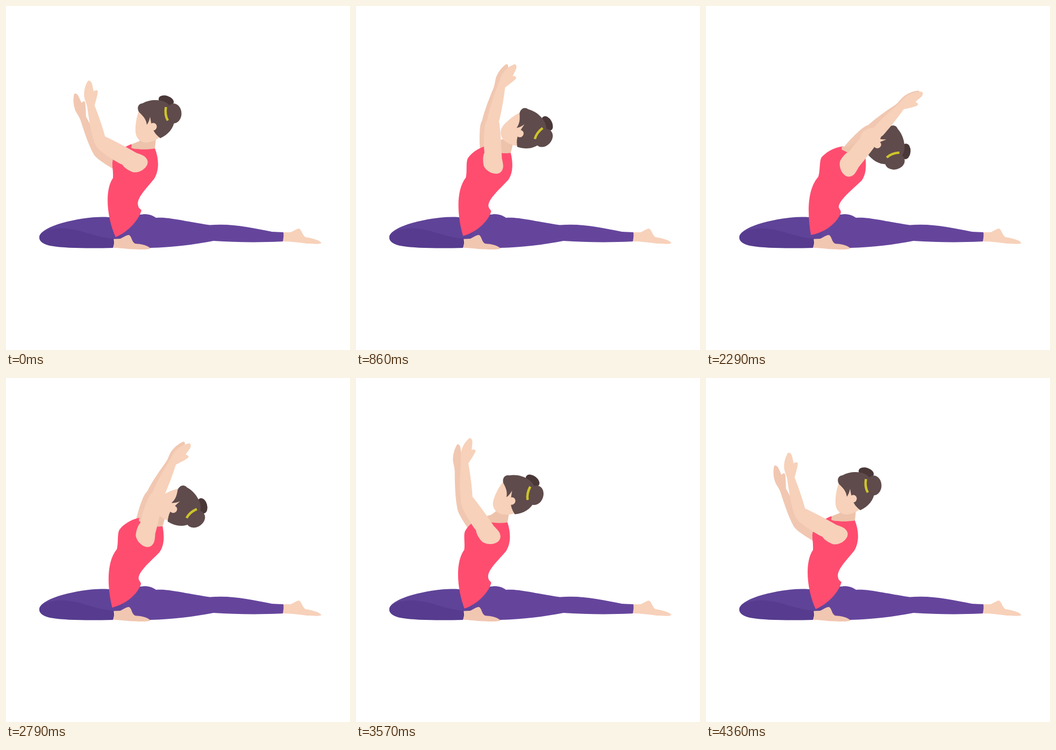
These frames come from a looping animation (640x640 px, 4.43 s). An HTML page:

```html
<!DOCTYPE html>
<html lang="en">
<head>
<meta charset="utf-8">
<title>Yoga stretch</title>
<style>
html, body { margin: 0; width: 100%; height: 100%; overflow: hidden; background: #fff; }
svg { display: block; width: 100vw; height: 100vh; }
.skin { fill: #f7d1ba; }
.shade { fill: #f1c7b1; }
.neck { fill: #edc3ab; }
.hair { fill: #5f4b4b; }
</style>
</head>
<body>
<svg viewBox="0 0 640 640">
  <defs>
    <path id="upper" d="M-17 6C-16 12 -12 16 -4 17C2 17 6 16 11 15C35 15 58 14 76 12.5C88 11 91 2 88 -5C86 -11 78 -14 68 -15.500C52 -18 32 -18 23 -17C18 -20 8 -21 -2 -19C-11 -15 -18 -4 -17 6Z"/>
    <path id="fore" d="M-6 -9C5 -12 32 -11 70 -6.500L70 6.500C45 10 25 11.500 5 12C-6 12 -10 0 -6 -9Z"/>
    <path id="hand" d="M-3 -6.500C8 -8 12 -11 20 -10.500C30 -10 40 -6 46 -1C47 2 44 5 40 6C34 7 30 7 25.500 8C28 11 28 15 25 15.500C20 15 12 12 -3 6.500Z"/>
  </defs>

  <g id="backArm" class="shade"></g>

  <path class="skin" d="M514 421L529 421C535 419 539 415 545 414C550 416 551 426 557 430C568 432 581 434 587 441C583 444 570 442 560 442C545 440 530 438 514 438Z"/>
  <path fill="#65459c" d="M200 392L250 388C262 386 272 389 279 394C300 392 325 399 379 407.500C420 404 455 412 495 420L516 421C517 427 516 433 515 438C480 440 430 440 386 437C350 444 310 449 268 450L235 452L200 433Z"/>
  <path fill="#5f4398" d="M62 430C62 420 82 410 105 403.500C135 395.500 165 391 192 393L225 400L213 433L200 434L100 440Z"/>
  <path fill="#563b8f" d="M62 430C63 420 80 414 105 413.500C140 415 163 430 200 433C202 439 201 445 199 450C160 451 110 451 85 446.500C70 444 61 438 62 430Z"/>
  <path class="shade" d="M201 433.500L212 433C218 431 223 426 229 426C234 429 234 439 240 442C250 443 262 444 269 451C265 454 245 453 235 452.500C225 452 212 450 199.500 450C201 445 202 439 201 433.500Z"/>

  <path id="torso" fill="#ff4d70"/>
  <path id="neck" class="neck"/>

  <g id="head">
    <ellipse cx="298" cy="176" rx="14.500" ry="9" transform="rotate(18 298 176)" fill="#4a3737"/>
    <path class="skin" d="M247 196C243 206 240 222 241 235C242 246 250 254 262 254C272 253 280 249 285 245L290 200L265 190Z"/>
    <path class="hair" d="M248 198C243 191 245 182 254 181C265 175 277 174 288 176C303 179 314 192 314 211C312 228 302 239 287 246C281 241 276 236 274 230L270 217L268 206C267 212 265 217 262 221C261 213 258 207 248 198Z"/>
    <ellipse cx="312" cy="200" rx="14.500" ry="18.500" class="hair"/>
    <ellipse cx="274" cy="224.500" rx="6.500" ry="7" class="skin"/>
    <path d="M297.500 188C296 197 297 206 301 213" fill="none" stroke="#cdc52a" stroke-width="4.500"/>
  </g>

  <g id="frontArm" class="skin"></g>
</svg>
<script>
const $ = id => document.getElementById(id);
const LOOP = 4430, FPS = 14, UPPER = 82, FORE = 68;

// Upright and leaning outlines of the trunk
const TORSO = [
  'M204 430C189 398 182 345 199 320C200 305 196 295 199 286C204 275 214 265 233 257C240 268 262 266 277 265C285 285 285 306 276 321C262 339 241 358 246 372C247 377 250 377 252 380C247 398 228 420 204 430Z',
  'M195 426C189 390 187 343 209 318C213 308 211 290 215 282C222 273 238 263 255 261C262 272 280 272 297 280C299 300 298 315 289 326C272 342 247 362 247 374C248 378 251 380 251 384C246 400 226 420 195 426Z'
];
const NECK = [
  'M234 257L247 252L255 245L279 246L277 265C262 268 240 267 233 264Z',
  'M253 262L268 261L285 250L305 258L297 280C280 283 262 272 253 267Z'
];

// Quadratic curves from upright to leaning.
// Head: x, y, turn. Arms: shoulder x, y, then upper arm, forearm and hand angles.
const HEAD = [[282, 194, 0], [341, 207, 39.5], [351, 262, 79]];
const FRONT = [[245, 292, 210, 256, 265], [256, 294, 266, 278, 304], [266, 299, 312, 315, 328]];
const BACK = [[241, 309, 209, 247, 251], [247, 298, 262, 282, 291], [252, 289, 315, 323, 325]];

const clamp = v => Math.min(1, Math.max(0, v));
const lerp = (a, b, k) => a + (b - a) * k;
const curve = ([a, b, c], k) =>
  a.map((v, i) => lerp(lerp(v, b[i], k), lerp(b[i], c[i], k), k));

function blend([a, b], k) {
  const ends = b.match(/-?[\d.]+/g);
  let i = 0;
  return a.replace(/-?[\d.]+/g, n => lerp(+n, +ends[i++], k).toFixed(2));
}

// Cubic ease with a chosen start slope and a soft landing
const ease = (s, lift) => 3 * lift * s * (1 - s) ** 2 + 3 * s * s * (1 - s) + s ** 3;

// Lean back, hold, come up again
const leanAt = ms =>
  ease(clamp(ms / 1615), 0) - ease(clamp((ms - 2214) / 2143), 0.25);

function makeArm(id, girth) {
  const parts = ['upper', 'fore', 'hand'].map(name => {
    const use = document.createElementNS('http://www.w3.org/2000/svg', 'use');
    use.setAttribute('href', '#' + name);
    return $(id).appendChild(use);
  });
  return ([x, y, ...angles]) => parts.forEach((part, i) => {
    part.setAttribute('transform',
      `translate(${x} ${y}) rotate(${angles[i]}) scale(1 ${girth})`);
    const r = angles[i] * Math.PI / 180, len = i ? FORE : UPPER;
    x += Math.cos(r) * len;
    y += Math.sin(r) * len;
  });
}

const frontArm = makeArm('frontArm', 1), backArm = makeArm('backArm', 0.85);

function draw(ms) {
  const step = Math.floor((ms % LOOP + 5) * FPS / 1000);
  const lean = leanAt(step * 1000 / FPS);
  const [x, y, turn] = curve(HEAD, lean);
  $('torso').setAttribute('d', blend(TORSO, lean));
  $('neck').setAttribute('d', blend(NECK, lean));
  $('head').setAttribute('transform',
    `translate(${x} ${y}) rotate(${turn}) translate(-282 -194)`);
  frontArm(curve(FRONT, lean));
  backArm(curve(BACK, lean));
}

let start;
function tick(now) {
  start ??= now;
  draw(now - start);
  requestAnimationFrame(tick);
}
draw(0);
requestAnimationFrame(tick);
</script>
</body>
</html>
```
